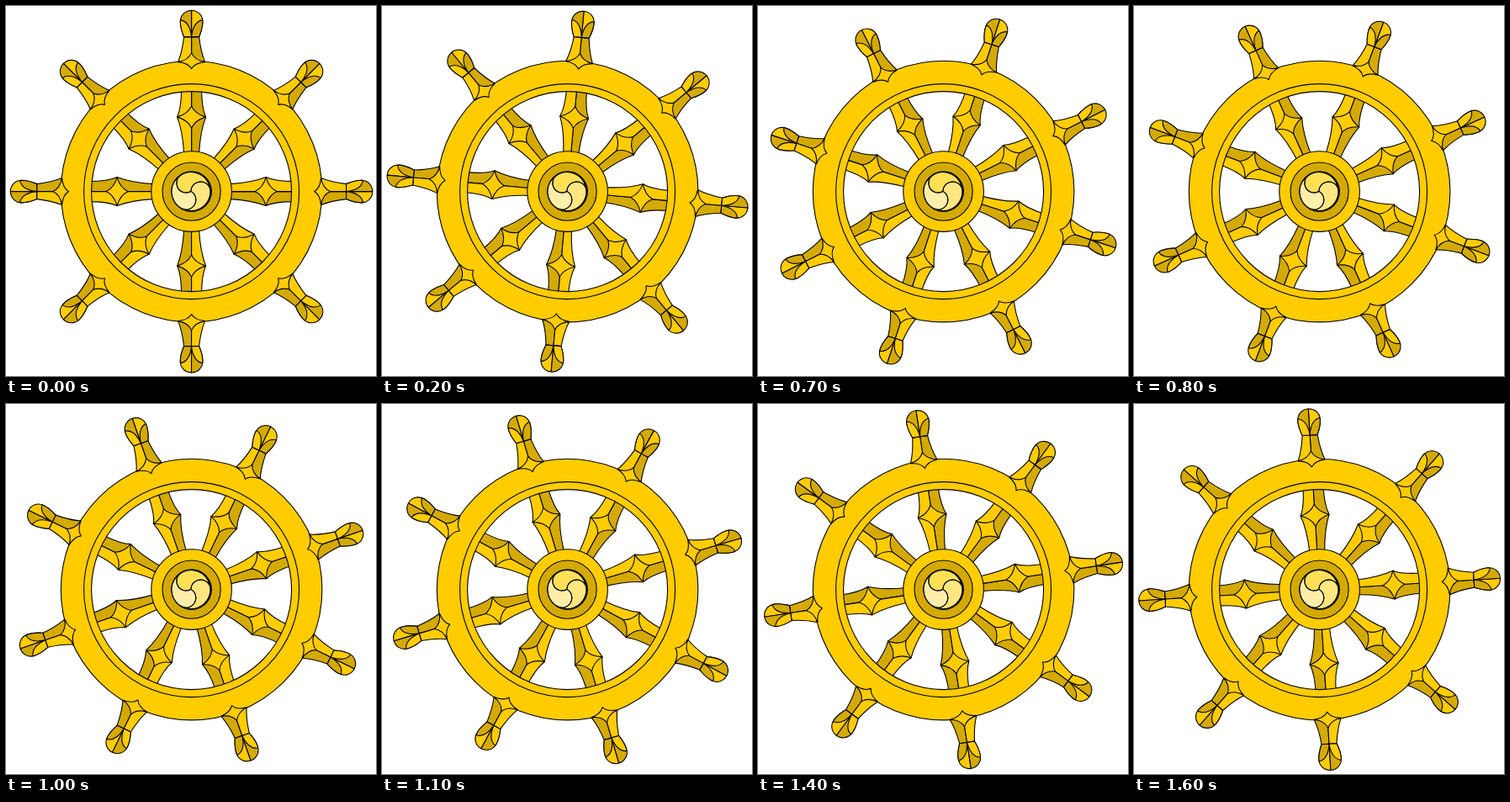
An HTML page with a canvas that plays this animation: 440 px wide and 440 px high, repeating every 1700 ms.

```html
<!DOCTYPE html>
<html lang="en">
<head>
<meta charset="utf-8">
<title>Turning wheel</title>
<style>
  html, body { margin: 0; width: 100%; height: 100%; overflow: hidden; background: #fff; }
  canvas { display: block; }
</style>
</head>
<body>
<canvas id="stage" width="440" height="440"></canvas>
<script>
const ctx = document.getElementById('stage').getContext('2d');
const GOLD = '#ffcc00', DARK = '#d4aa00';
const SWIRL = ['#ffe055', '#ffe680', '#ffeeaa'];
const CENTER = 220.6, STEP_MS = 100, STEPS = 17, STEP_DEG = 2.59;
const rad = deg => deg * Math.PI / 180;

// Spoke parts point up from the hub; halves show the clockwise side.
const innerHalf = new Path2D('M0-46 H9 Q10.5-72 17-88.5 Q12-99 12-122 H0Z');
const innerStar = new Path2D('M0-75.5 Q4.5-85 17-88.5 Q4.5-92 0-101.5 Q-4.5-92-17-88.5 Q-4.5-85 0-75.5Z');
const shaftHalf = new Path2D('M0-150 L16-154 Q11-166 9-184 H0Z');
const rimStar = new Path2D('M0-146 Q4-153 16-154 Q4-156 0-165 Q-4-156-16-154 Q-4-153 0-146Z');
const knobHalf = new Path2D('M0-184 H9 C11-189 13.3-194 13.3-202 C13.3-210 7-215.3 0-215.3Z');
const leaf = new Path2D('M0-184 H9 C11-189 13.3-194 13.3-202 L13-204 Q2-202 0-184Z');

function paint(path, fill) {
  ctx.fillStyle = fill;
  ctx.fill(path);
  ctx.stroke(path);
}

function disc(radius, fill) {
  const path = new Path2D();
  path.arc(0, 0, radius, 0, 2 * Math.PI);
  paint(path, fill);
}

function bothSides(path, right, left) {
  paint(path, right);
  ctx.save();
  ctx.scale(-1, 1);
  paint(path, left);
  ctx.restore();
}

function around(count, turn, draw) {
  for (let i = 0; i < count; i++) {
    ctx.save();
    ctx.rotate(turn + i * 2 * Math.PI / count);
    draw(i);
    ctx.restore();
  }
}

function drawRim() {
  const rim = new Path2D();
  rim.arc(0, 0, 155.3, 0, 2 * Math.PI);
  rim.moveTo(119, 0);
  rim.arc(0, 0, 119, 0, 2 * Math.PI, true);
  paint(rim, GOLD);
  ctx.beginPath();
  ctx.arc(0, 0, 128, 0, 2 * Math.PI);
  ctx.stroke();
}

function drawHub() {
  const radius = 23, half = radius / 2;
  const comma = new Path2D();
  comma.arc(0, -half, half, rad(90), rad(270));
  comma.arc(0, 0, radius, rad(-90), rad(30));
  comma.arc(half * Math.cos(rad(30)), half * Math.sin(rad(30)), half, rad(30), rad(210), true);
  disc(47.8, GOLD);
  disc(34.6, DARK);
  disc(23.8, '#000');
  ctx.translate(-0.6, 0);
  around(3, rad(-30), i => paint(comma, SWIRL[i]));
}

function draw(now) {
  const turn = rad(Math.floor(now / STEP_MS) % STEPS * STEP_DEG);
  ctx.setTransform(1, 0, 0, 1, 0, 0);
  ctx.fillStyle = '#fff';
  ctx.fillRect(0, 0, 440, 440);
  ctx.translate(CENTER, CENTER);
  ctx.lineWidth = 1.1;
  ctx.lineJoin = 'round';
  ctx.strokeStyle = '#000';
  around(8, turn, () => {
    bothSides(innerHalf, DARK, GOLD);
    paint(innerStar, GOLD);
    bothSides(shaftHalf, DARK, GOLD);
    bothSides(knobHalf, GOLD, DARK);
    bothSides(leaf, DARK, GOLD);
  });
  drawRim();
  around(8, turn, () => paint(rimStar, GOLD));
  drawHub();
}

const start = performance.now();
function tick() {
  draw(performance.now() - start);
  requestAnimationFrame(tick);
}
tick();
</script>
</body>
</html>
```
